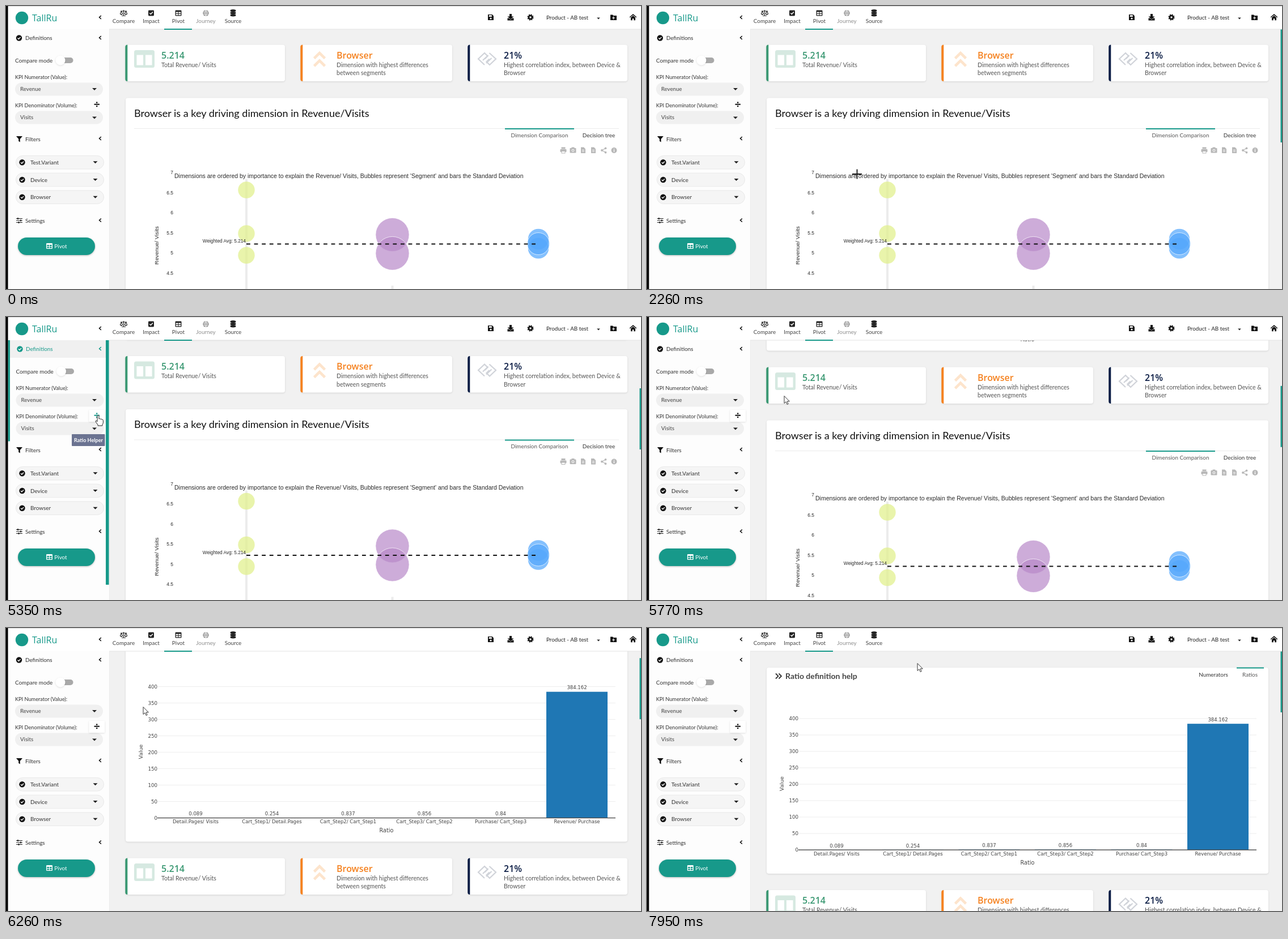
An HTML page that plays this animation: 1120x500 px, repeating every 8000 ms.

```html
<!DOCTYPE html>
<html lang="en">
<head>
<meta charset="utf-8">
<title>Pivot dashboard</title>
<style>
html, body { margin: 0; width: 100%; height: 100%; overflow: hidden; background: #f1f1f1; }
svg { display: block; width: 100vw; height: 100vh; font-family: Lato, sans-serif; fill: #333; }
.head { font-family: "Open Sans", sans-serif; font-weight: 600; }
.plot { font-family: "Liberation Sans", Arial, sans-serif; fill: #2a2a2a; }
.bars { font-family: "DejaVu Sans", sans-serif; fill: #444; }
.mid { text-anchor: middle; }
.end { text-anchor: end; }
.line { fill: none; }
.card { fill: #fff; filter: drop-shadow(0 1px 1.5px rgba(0,0,0,.12)); }
</style>
</head>
<body>
<svg id="stage" viewBox="0 0 1120 500"></svg>
<script>
const TEAL = '#17998a';

const text = (x, y, s, size = 9.9, attrs = '') => `<text x="${x}" y="${y}" font-size="${size}" ${attrs}>${s}</text>`;
const rect = (x, y, w, h, fill, r = 0, attrs = '') =>
  `<rect x="${x}" y="${y}" width="${w}" height="${h}" rx="${r}" fill="${fill}" ${attrs}/>`;
const disc = (x, y, r, fill, attrs = '') => `<circle cx="${x}" cy="${y}" r="${r}" fill="${fill}" ${attrs}/>`;
const line = (d, color, w = 1, attrs = '') => `<path class="line" d="${d}" stroke="${color}" stroke-width="${w}" ${attrs}/>`;
const shape = (d, fill) => `<path d="${d}" fill="${fill}"/>`;
const at = (x, y, body, id = '') => `<g transform="translate(${x} ${y})" ${id && `id="${id}"`}>${body}</g>`;

const caret = (x, y, s = 4) => shape(`M${x - s} ${y - s / 2}h${2 * s}l${-s} ${s}z`, '#222');
const chevron = (x, y, color = '#111') => line(`M${x + 1.8} ${y - 3}l-3.2 3 3.2 3`, color, 1.6);
const check = (x, y, color = '#111') => disc(x, y, 5.2, color) + line(`M${x - 2.5} ${y}l1.9 1.9 3.2-3.5`, '#fff', 1.4);
const grid = (x, y, color, bg) => rect(x, y, 11, 10, color, 1.2) +
  [1.3, 6].map(dx => [3, 6.4].map(dy => rect(x + dx, y + dy, 3.7, 2.3, bg)).join('')).join('');

function header() {
  const labels = [[207.5, 'Compare'], [256, 'Impact'], [304, 'Pivot'], [352.5, 'Journey', '#8f8f8f'], [400.5, 'Source']];
  const k = '#222';
  return rect(3.5, 0, 1117, 41, '#fff') + rect(3.5, 0, 1117, 1, '#d9d9d9') + rect(182, 40.5, 938, 1, '#e4e4e4') +
    disc(28, 21, 11.2, TEAL) + text(46, 27, 'TallRu', 16, `class="head" fill="${TEAL}" style="font-weight:400"`) +
    chevron(166, 20) + rect(279, 40, 49, 2, TEAL) +
    labels.map(([x, s, c = '#444']) => text(x, 29.5, s, 9.9, `class="mid" fill="${c}"`)).join('') +
    line('M202 9h11M207.5 7v10M204 17.2h7M203.5 9l-2.2 5M203.5 9l2.2 5M211.5 9l-2.2 5M211.5 9l2.2 5', k, 1.1) +
    shape('M200.8 14h5.4q-2.7 3.4-5.4 0M208.8 14h5.4q-2.7 3.4-5.4 0', k) +
    rect(251, 7.5, 10, 10, k, 1.4) + line('M253.3 12.5l2 2 3.6-4', '#fff', 1.5) +
    grid(298.5, 7.5, k, '#fff') +
    disc(352.5, 12.5, 5.3, '#8f8f8f') +
    line('M347 10.7h11M347 14.3h11M352.5 7v11M352.5 7.3q-5 5.2 0 10.4M352.5 7.3q5 5.2 0 10.4', '#fff', .7) +
    [7, 11, 15].map(y => shape(`M395.7 ${y}q4.8-2 9.6 0v2.6q-4.8 2-9.6 0z`, k)).join('') +
    shape('M850 15h7.5l2.5 2.5v7.5h-10z', '#111') + rect(851.8, 16.2, 5, 2.8, '#fff') + disc(855, 22, 1.6, '#fff') +
    shape('M888 14h4v4.5h3.5l-5.5 5-5.5-5h3.5zM884.5 21.5h2.5l3 2.5 3-2.5h2.5v4h-11z', '#111') +
    disc(925, 20, 3, 'none', 'stroke="#111" stroke-width="2.6"') +
    disc(925, 20, 4.7, 'none', 'stroke="#111" stroke-width="1.7" stroke-dasharray="2.1 1.59"') +
    text(953, 23.5, 'Product - AB test', 9.8, 'fill="#222"') + caret(1045, 22, 2.8) +
    shape('M1066 15.5h4l1.5 1.5h5.5v8h-11z', '#111') + line('M1071.5 18.5v5M1069 21h5', '#fff', 1.2) +
    shape('M1106 14l6.3 5.6-.9 1-5.4-4.7-5.4 4.7-.9-1zM1102 20.5l4-3.5 4 3.5v4.7h-2.8v-3h-2.4v3h-2.8z', '#111');
}

function sidebar() {
  const pill = (y, s) => rect(16, y - 11.5, 155, 23, '#f0f0f0', 11.5) + text(25, y + 3, s, 9.7, 'fill="#444"');
  const filter = (y, s) => rect(17.5, y - 11.8, 155, 23.6, '#f5f5f5', 11.8, 'stroke="#e9e9e9"') +
    check(28.5, y) + text(43, y + 3.5, s) + caret(157.5, y);
  return rect(3.5, 41, 178.5, 459, '#fdfdfd') + rect(182, 41, 1, 459, '#ececec') +
    `<g id="active">${rect(3.5, 41, 3.5, 178.5, TEAL)}${rect(7, 41, 169, 31, '#f0f0f0')}${rect(176, 41, 5.5, 432, TEAL)}</g>` +
    `<g id="defs">` +
      `<g id="defsOff">${check(23, 56.5)}${text(34, 60, 'Definitions')}</g>` +
      `<g id="defsOn">${check(23, 56.5, TEAL)}${text(33.5, 60, 'Definitions', 9.9, `fill="${TEAL}"`)}</g>` +
      text(16, 99.5, 'Compare mode') + rect(92, 91, 26.5, 10, '#a9a9a9', 5) +
      disc(96, 96, 8.5, '#fff', 'class="card"') +
      text(16, 128.5, 'KPI Numerator (Value):', 9.2) + pill(147, 'Revenue') +
      text(16, 178.5, 'KPI Denominator (Volume):', 9.2) + pill(197, 'Visits') +
    `</g>` +
    `<g id="chev">${chevron(166, 56, 'currentColor')}</g>` + caret(156, 147) + caret(156, 197.5) +
    `<g id="focus">${rect(146.5, 164, 27.5, 21, '#fdfdfd', 1, 'class="card"')}</g>` +
    `<g id="divide" fill="#111">${rect(155.5, 172.8, 9.5, 2, 'inherit', .5)}${disc(160.2, 170.6, 1.3, 'inherit')}${disc(160.2, 177.1, 1.3, 'inherit')}</g>` +
    shape('M18 230h11l-4.2 5v5.5l-2.6-1.8v-3.7z', '#111') + text(34, 238.5, 'Filters') + chevron(166, 234) +
    filter(276.3, 'Test.Variant') + filter(307, 'Device') + filter(337.7, 'Browser') +
    line('M18 375.5h11M18 379h11M18 382.5h11', '#222', 1.2) +
    line('M21 374v3M26 377.5v3M22.5 381v3', '#222', 1.8) +
    text(34, 382.5, 'Settings') + chevron(166, 378.5) +
    rect(21, 409, 136, 31, TEAL, 15.5, 'style="filter:drop-shadow(0 1.5px 1.5px rgba(0,0,0,.26))"') +
    grid(71, 419, '#fff', TEAL) + text(96.5, 427.5, 'Pivot', 9.9, 'class="mid" fill="#fff"') +
    `<g id="tip">${rect(116, 207, 58.5, 21, '#6b7391', 1)}${text(145.5, 221, 'Ratio Helper', 9.1, 'class="mid" font-weight="700" fill="#fff"')}</g>`;
}

function cards() {
  const card = (x, w, color, title, ...rows) => rect(x, 68.5, w, 64.5, '#fff', 4, 'class="card"') +
    shape(`M${x + 3.3} 68.5v64.5q-4 0-4-4v-56.5q0-4 4-4z`, color) +
    text(x + 63, 92.5, title, 16, `class="head" fill="${color}"`) +
    rows.map((s, i) => text(x + 63, 107.5 + i * 14.5, s, 10.5, 'fill="#555"')).join('');
  return card(211, 281, '#3a9872', '5.214', 'Total Revenue/ Visits') +
    card(520, 267, '#f58220', 'Browser', 'Dimension with highest differences', 'between segments') +
    card(815, 281, '#0a1c44', '21%', 'Highest correlation index, between Device &amp;', 'Browser') +
    rect(226, 78, 36, 31, '#d6e9e1', 3.5) + rect(230.5, 86.5, 11.5, 18, '#fff') + rect(246, 86.5, 11.5, 18, '#fff') +
    line('M543.5 92.5l9.5-9.5 9.5 9.5M543.5 106l9.5-9.5 9.5 9.5', '#fde4cc', 4.6) +
    line('M844 104l-11-10.5 11-10.5 5.5 5.5-5 5M852.5 83l11.5 10.5-11 10.5-5.5-5.5 5-5M841 96l9.5-9M847 101l9.5-9', '#d0d3d9', 2.2);
}

function bubbles() {
  const tick = i => text(295, 297 + i * 35.5, 7 - i / 2, 8.4, 'class="end"');
  const ring = 'stroke="#fff" stroke-width=".8" stroke-opacity=".85"';
  const blue = (y, r, attrs = '') => disc(939, y, r, '#55a8fc', `fill-opacity=".72" ${attrs}`);
  const gray = '#b8b8b8';
  return rect(211, 162.5, 885, 400, '#fff', 4, 'class="card"') +
    text(226, 195.5, 'Browser is a key driving dimension in Revenue/Visits', 18.05, 'fill="#111"') +
    rect(226, 216, 855, 1, '#ebebeb') + rect(880, 216, 122, 2, TEAL) +
    text(941, 231.5, 'Dimension Comparison', 9.9, 'class="mid" fill="#555"') +
    text(1045.5, 231.5, 'Decision tree', 9.9, 'class="mid"') +
    rect(977.5, 253, 11, 5, gray, 1) + rect(979.5, 249.5, 7, 3, gray) + rect(980, 256.5, 6, 3.5, '#fff', 0, `stroke="${gray}"`) +
    rect(994.5, 251, 11, 8.5, gray, 1.2) + rect(997.5, 249.5, 5, 3, gray) + disc(1000, 255.2, 2.4, '#fff') + disc(1000, 255.2, 1.4, gray) +
    [1014, 1032].map(x => shape(`M${x} 249.5h5l3 3v7.5h-8z`, gray) + line(`M${x + 2} 254.5h4M${x + 2} 257h4`, '#fff', 1)).join('') +
    line('M1057.5 251.5l-6.5 3.5 6.5 3.5', gray, 1.4) +
    [[1057.5, 251.3], [1051, 255], [1057.5, 258.7]].map(([x, y]) => disc(x, y, 1.9, gray)).join('') +
    disc(1072.5, 255, 5, gray) + line('M1072.5 252v1.3M1072.5 254.3v3.5', '#fff', 1.4) +
    `<g class="plot">` + [0, 1, 2, 3, 4, 5].map(tick).join('') +
      rect(422, 306, 4, 260, '#ececec') + rect(679.5, 494, 4, 60, '#ececec') +
      text(297, 304, "Dimensions are ordered by importance to explain the Revenue/ Visits, Bubbles represent 'Segment' and bars the Standard Deviation", 10.5) +
      text(0, 0, 'Revenue/ Visits', 9.8, 'class="mid" transform="translate(268.5 423) rotate(-90)"') +
      [325, 402, 440.5].map(y => disc(424, y, 14.7, '#e1f08f', 'fill-opacity=".75"')).join('') +
      [404, 437].map(y => disc(681.5, y, 29.6, '#b889c9', `fill-opacity=".7" ${ring}`)).join('') +
      blue(412, 18.3) + blue(428, 18.3) + blue(420, 19.5, ring) +
      line('M424 420.5H936', '#111', 2.2, 'stroke-dasharray="6.8"') +
      text(423, 418, 'Weighted Avg: 5.214', 8.3, 'class="end"') +
    `</g>`;
}

function ratios() {
  const data = [['Detail.Pages/ Visits', .089], ['Cart_Step1/ Detail.Pages', .254], ['Cart_Step2/ Cart_Step1', .837],
    ['Cart_Step3/ Cart_Step2', .856], ['Purchase/ Cart_Step3', .84], ['Revenue/ Purchase', 384.162]];
  const base = 392, unit = .58;
  let out = rect(211, 70, 885, 364, '#fff', 4, 'class="card"') +
    line('M227 80.5l4.5 4.5-4.5 4.5M232.5 80.5l4.5 4.5-4.5 4.5', '#333', 1.8) +
    text(244, 90, 'Ratio definition help', 14, 'font-weight="700" fill="#444"') +
    text(999, 86, 'Numerators', 9.9, 'class="mid"') + rect(1040, 69.5, 48, 2, TEAL) +
    text(1063.5, 86, 'Ratios', 9.9, 'class="mid" fill="#555"') + '<g class="bars">';
  for (let v = 0; v <= 400; v += 50) {
    const y = base - v * unit;
    out += rect(267, y - .5, 808, 1, '#eee') + text(267, y + 3, v, 8.6, 'class="end"');
  }
  data.forEach(([name, v], i) => {
    const x = 334.5 + i * 134.5, h = v * unit;
    out += rect(x - 54, base - h, 108, h, '#1f77b4') +
      text(x, base - h - 4.3, v, 8.5, 'class="mid"') + text(x, 401.5, name, 8.5, 'class="mid"');
  });
  return out + rect(267, base - .6, 808, 1.3, '#444') + text(671, 417.5, 'Ratio', 9.7, 'class="mid"') +
    text(0, 0, 'Value', 9.4, 'class="mid" transform="translate(240.5 275) rotate(-90)"') + '</g>';
}

const pointers = {
  cross: line('M-8.5 0h17M0-8.5v17', '#111', 1.8),
  arrow: '<path d="M.5.5v13l3-2.7 2.2 4.7 2-1-2.2-4.5h4.3z" fill="#fff" stroke="#333"/>',
  hand: '<path d="M-1.5 1.2a1.5 1.5 0 0 1 3 0V6q1.6-1 2.7.4 1.6-.7 2.5.6 2-.4 2.2 1.6v3.6q0 2-1.5 4.3V18H-.5v-1.6L-4.3 11.2q-.6-1.7.8-2 1 0 2 1.6z" fill="#fff" stroke="#222"/>'
};

document.getElementById('stage').innerHTML =
  rect(0, 0, 1120, 500, '#f1f1f1') +
  at(0, 0, `<g id="ratios">${at(0, -394.5, ratios())}</g>` + cards() + bubbles(), 'page') +
  rect(1117.5, 41, 2.5, 200, TEAL, 0, 'id="thumb"') +
  sidebar() + header() + rect(0, 0, 3.5, 500, '#000') +
  disc(160, 177, 10.5, '#f8f23c', 'id="click"') +
  at(0, 0, Object.entries(pointers).map(([id, s]) => `<g id="${id}">${s}</g>`).join(''), 'pointer');

const el = id => document.getElementById(id);
const show = (id, on) => { el(id).style.display = on ? '' : 'none'; };

// bursts of motion: start, end, number of pictures
const bursts = [[580, 790, 4], [1720, 1990, 5], [2260, 3150, 14], [3810, 4360, 8], [5350, 6400, 16], [7190, 7950, 12]];
const path = [[580, 1010, 490], [790, 744.5, 418], [1650, 744.5, 418], [1850, 520, 335], [1990, 378.5, 298],
  [2190, 378.5, 298], [2260, 370.5, 297], [2460, 310, 272], [2660, 215, 222], [2860, 163, 186], [3150, 159.5, 175],
  [5280, 159.5, 175], [5350, 162.5, 174], [5480, 190, 160], [5690, 241.5, 139], [7120, 241.5, 139],
  [7260, 330, 175], [7400, 560, 235], [7540, 769, 253], [7680, 690, 120], [7810, 560, 19], [7950, 476.5, 62]];
const scroll = [[5690, .5], [5770, 20], [5980, 152.5], [6260, 338], [6400, 394.5]];

function snap(t) {
  const b = bursts.filter(b => t >= b[0]).pop();
  if (!b) return 0;
  const step = (b[1] - b[0]) / (b[2] - 1);
  return Math.min(b[1], b[0] + Math.floor((t - b[0]) / step + 1e-6) * step);
}

function follow(keys, t) {
  const i = keys.findIndex(k => k[0] > t);
  if (i === 0) return keys[0].slice(1);
  if (i < 0) return keys[keys.length - 1].slice(1);
  const [a, b] = [keys[i - 1], keys[i]], p = (t - a[0]) / (b[0] - a[0]);
  return a.slice(1).map((v, j) => v + (b[j + 1] - v) * p);
}

function draw(now) {
  const t = snap(now % 8000);
  const [x, y] = follow(path, t);
  const loaded = t >= 4100;
  const offset = loaded ? follow(scroll, t)[0] : 0;
  const inSide = t >= 580 && x < 182;
  const onButton = inSide && Math.abs(x - 160) < 13 && Math.abs(y - 175) < 13;
  const onPlot = t < 5000 ? x > 296 && y > 262 : t > 7000 && x > 267 && y > 157;
  const kind = onButton ? 'hand' : onPlot ? 'cross' : 'arrow';

  el('page').setAttribute('transform', `translate(0 ${offset})`);
  show('ratios', loaded);
  show('thumb', t >= 580);
  el('thumb').setAttribute('y', loaded ? 41 + (394.5 - offset) * .2157 : 41);
  el('thumb').setAttribute('height', loaded ? 108 : t >= 2700 ? 133 : 200);

  show('active', inSide);
  show('defsOn', inSide);
  show('defsOff', !inSide);
  show('tip', onButton);
  show('focus', t >= 3880);
  el('defs').setAttribute('transform', `translate(${inSide ? 1.5 : 0} 0)`);
  el('chev').style.color = inSide ? TEAL : '#111';
  el('divide').setAttribute('fill', onButton ? TEAL : '#111');
  el('click').setAttribute('opacity', t < 3810 ? 0 : Math.max(0, .75 * Math.min(1, (4280 - t) / 300)));

  show('pointer', t >= 580);
  el('pointer').setAttribute('transform', `translate(${x} ${y})`);
  for (const id in pointers) show(id, id === kind);
}

function tick() {
  draw(performance.now());
  requestAnimationFrame(tick);
}
tick();
</script>
</body>
</html>
```
